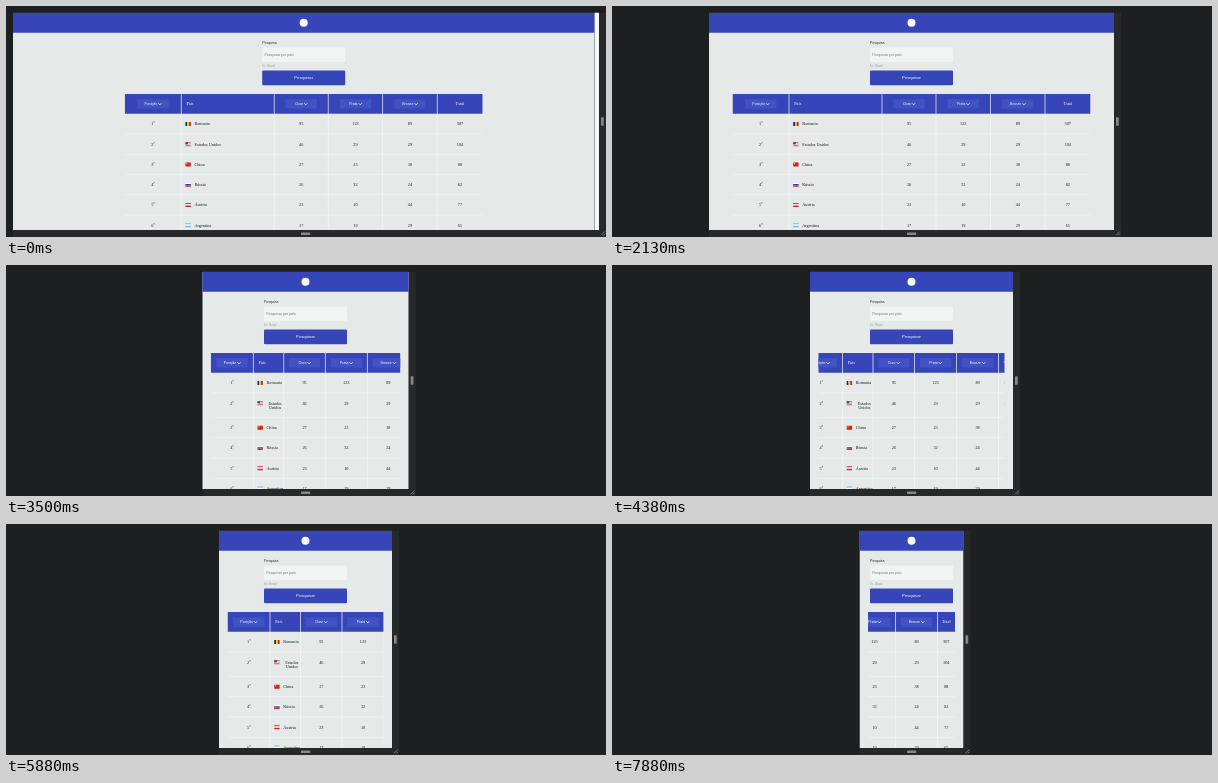
These frames come from a looping animation (600x231 px, 8 s). An HTML page with a canvas:

```html
<!DOCTYPE html>
<html lang="pt">
<head>
<meta charset="utf-8">
<title>Quadro de medalhas</title>
<style>
html, body { margin: 0; width: 100%; height: 100%; overflow: hidden; background: #1e1f20; }
canvas { display: block; width: 600px; height: 231px; }
</style>
</head>
<body>
<canvas id="stage" width="600" height="231"></canvas>
<script>
const ctx = document.getElementById('stage').getContext('2d');
const LOOP = 8000, STEP = 125;
const TOP = 6.7, BOTTOM = 224;
const BLUE = '#3646b9', PAGE = '#e5eae9', LINE = '#f3f6f5', INK = '#161819';
const SERIF = '"Liberation Serif", "Times New Roman", serif';
const SANS = '"Liberation Sans", Arial, sans-serif';

// [time, value] pairs, linear in between
const leftEdge = [[875, 7], [1375, 45], [1750, 79], [1875, 82.5], [2000, 82.5],
  [2125, 97], [2250, 110], [2375, 110], [2750, 183], [2875, 194], [3000, 194],
  [3875, 198], [5375, 198], [5875, 213], [6250, 224.5], [7125, 247.5]];
const scroll = [[4250, 0], [4375, 18.5], [4500, 30], [5375, 30], [5500, 14], [5625, 0],
  [7250, 0], [7375, 65], [7500, 130]];

const wideCols = [56.5, 93, 54, 54.5, 54.5, 45.5];
const slimCols = [42.5, 30.5, 41.5, 42, 42, 17.5];
const heads = ['Posição', 'País', 'Ouro', 'Prata', 'Bronze', 'Total'];
const rows = [
  ['Romania', 95, 123, 89],
  ['Estados Unidos', 46, 29, 29],
  ['China', 27, 23, 38],
  ['Rússia', 26, 32, 24],
  ['Áustria', 23, 10, 44],
  ['Argentina', 17, 19, 29]
];
const flags = [
  ['v', '#12306f', '#f2c819', '#c8202c'],
  ['h', '#c3575f', '#f0e4e4', '#c3575f', '#f0e4e4', '#c3575f'],
  ['h', '#d81f18'],
  ['h', '#ffffff', '#2342a6', '#d02730'],
  ['h', '#d8232e', '#ffffff', '#d8232e'],
  ['h', '#79b5e0', '#ffffff', '#79b5e0']
];

function track(keys, t) {
  if (t <= keys[0][0]) return keys[0][1];
  for (let i = 1; i < keys.length; i++) {
    const [t0, a] = keys[i - 1], [t1, b] = keys[i];
    if (t <= t1) return a + (b - a) * (t - t0) / (t1 - t0);
  }
  return keys[keys.length - 1][1];
}

function box(x, y, w, h, color, r = 0) {
  ctx.fillStyle = color;
  ctx.beginPath();
  ctx.roundRect(x, y, w, h, r);
  ctx.fill();
}

function text(str, x, y, size, color, align = 'left', family = SERIF, weight = '') {
  ctx.font = `${weight} ${size}px ${family}`;
  ctx.fillStyle = color;
  ctx.textAlign = align;
  ctx.fillText(str, x, y + size * 0.33);
}

function clip(x, y, w, h) {
  ctx.save();
  ctx.beginPath();
  ctx.rect(x, y, w, h);
  ctx.clip();
}

function flag(i, x, y) {
  const [dir, ...bands] = flags[i], n = bands.length;
  bands.forEach((c, k) => dir === 'v'
    ? box(x + k * 5.4 / n, y, 5.4 / n, 4, c)
    : box(x, y + k * 4 / n, 5.4, 4 / n, c));
  if (i === 1) box(x, y, 2.5, 2.2, '#38446f');
  if (i === 2) box(x + 0.8, y + 0.7, 1.1, 1.1, '#f3d32c');
}

function sortButton(label, cx, y) {
  box(cx - 15.7, y - 4.6, 31.4, 9.2, '#4152c2', 1);
  ctx.font = `3.54px ${SANS}`;
  const w = ctx.measureText(label).width, x = cx - (w + 4.2) / 2;
  text(label, x, y, 3.54, '#fff', 'left', SANS);
  const vx = x + w + 1.2;
  ctx.strokeStyle = '#fff';
  ctx.lineWidth = 0.9;
  ctx.beginPath();
  ctx.moveTo(vx, y - 0.6);
  ctx.lineTo(vx + 1.5, y + 0.9);
  ctx.lineTo(vx + 3, y - 0.6);
  ctx.stroke();
}

function table(cx, viewW, offset) {
  const shown = Math.min(358, viewW - 17);
  const width = Math.max(216, shown);
  const k = (width - 216) / 142;
  const cols = slimCols.map((s, i) => s + (wideCols[i] - s) * k);
  const left = cx - shown / 2;
  const wrap = cols[1] < 42;
  clip(left, 80, shown, 150);
  const xs = [left - Math.min(offset, width - shown)];
  cols.forEach((w, i) => xs.push(xs[i] + w));
  const mid = i => (xs[i] + xs[i + 1]) / 2;

  box(xs[0], 88, width, 19.7, BLUE);
  heads.forEach((h, i) => {
    if (i === 1) text(h, xs[1] + 5.2, 97.9, 4.25, '#fff');
    else if (i === 5) text(h, mid(5), 97.9, 4.25, '#fff', 'center');
    else sortButton(h, mid(i), 97.9);
  });

  let y = 107.7;
  rows.forEach(([name, ...medals], i) => {
    const ty = y + 10.2;
    text(i + 1 + 'º', mid(0), ty, 4.25, INK, 'center');
    flag(i, xs[1] + 4.2, ty - 2);
    if (wrap && name.includes(' ')) {
      name.split(' ').forEach((part, n) =>
        text(part, xs[1] + 21.8, ty + n * 4.5, 4.25, INK, 'center'));
    } else text(name, xs[1] + 13.2, ty, 4.25, INK);
    const total = medals.reduce((a, b) => a + b);
    [...medals, total].forEach((v, n) => text(v, mid(n + 2), ty, 4.25, INK, 'center'));
    y += wrap && i === 1 ? 24.5 : 20.25;
    box(xs[0], y - 0.3, width, 0.6, LINE);
  });
  for (let i = 1; i < 6; i++) box(xs[i] - 0.35, 88, 0.7, 140, LINE);
  ctx.restore();
}

function page(left, right, cx, offset) {
  clip(left, TOP, right - left, BOTTOM - TOP);
  box(left, TOP, right - left, BOTTOM - TOP, PAGE);
  box(left, TOP, right - left, 20, BLUE);
  ctx.fillStyle = '#fff';
  ctx.beginPath();
  ctx.arc(cx, 16.7, 4, 0, Math.PI * 2);
  ctx.fill();

  const x = cx - 41.5;
  text('Pesquisa', x, 37.2, 3.54, '#25282a', 'left', SANS);
  box(x, 41.5, 83, 14.6, '#f2f4f3', 1);
  text('Pesquisar por país', x + 2.2, 48.7, 3.54, '#747878', 'left', SANS);
  text('Ex: Brasil', x, 60.2, 3, '#96a3a2', 'left', SANS);
  box(x, 64.4, 83, 14.8, BLUE, 1);
  text('Pesquisar', cx, 71.8, 4.25, '#fff', 'center', SANS);
  table(cx, right - left, offset);
  ctx.restore();
}

function resizers(left, right) {
  box(right, TOP, 7, 231 - TOP, '#27282a');
  box(left, BOTTOM, right - left, 7, '#27282a');
  box(right + 2, 111.3, 2.7, 8.4, '#85888a', 0.5);
  box(295, 226.5, 9.2, 2.6, '#85888a', 0.5);
  ctx.strokeStyle = '#8c8f91';
  ctx.lineWidth = 0.8;
  ctx.beginPath();
  ctx.moveTo(right + 2, 229.3);
  ctx.lineTo(right + 5.8, 225.5);
  ctx.moveTo(right + 4.2, 229.5);
  ctx.lineTo(right + 6, 227.7);
  ctx.stroke();
}

function draw(time) {
  const t = Math.floor(time % LOOP / STEP) * STEP;
  const left = track(leftEdge, t);
  const full = t < 1000;
  const right = full ? 593 : 599 - left;
  box(0, 0, 600, 231, '#1e1f20');
  resizers(left, right);
  if (full) box(588.5, TOP, 4.5, BOTTOM - TOP, '#f6f7f7');
  page(left, full ? 588.5 : right, full ? 297.7 : 299.5, track(scroll, t));
}

const start = performance.now();
function tick() {
  draw(performance.now() - start);
  requestAnimationFrame(tick);
}
tick();
</script>
</body>
</html>
```
